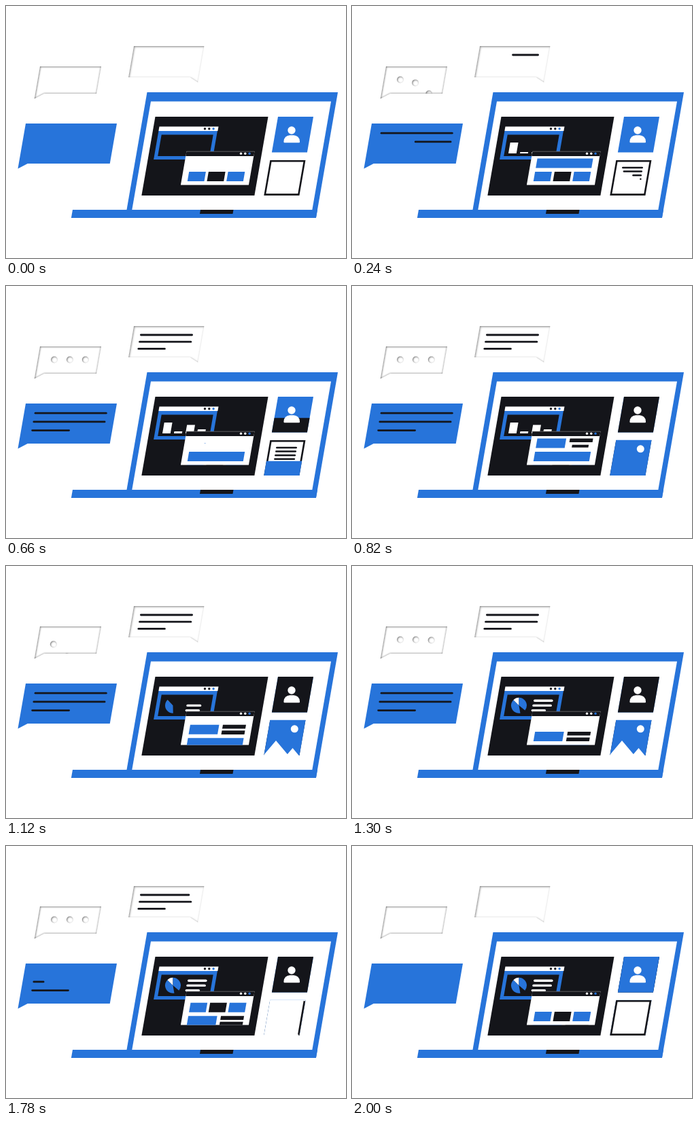
These frames come from a looping animation (500 px wide and 371 px high, 2.02 s). An HTML page with a canvas:

```html
<!DOCTYPE html>
<html>
<head>
<meta charset="utf-8">
<style>
html, body { margin: 0; width: 100%; height: 100%; overflow: hidden; background: #fff; }
canvas { display: block; }
</style>
</head>
<body>
<canvas id="stage" width="500" height="371"></canvas>
<script>
const ctx = document.getElementById('stage').getContext('2d');
const BLUE = '#2774da', DARK = '#14151a', WHITE = '#fff';
const SLANT = 0.1735, LOOP = 2020;
let t = 0;

const linear = (start, span) => Math.min(1, Math.max(0, (t - start) / span));

// Eased progress of a move
function ease(start, span) {
  const p = linear(start, span);
  return p < 0.5 ? 2 * p * p : 1 - 2 * (1 - p) ** 2;
}

function repeat(count, draw) {
  for (let i = 0; i < count; i++) draw(i);
}

function polygon(...points) {
  const path = new Path2D();
  points.forEach(([x, y]) => path.lineTo(x, y));
  path.closePath();
  return path;
}

// Every panel leans by the same angle; x is its top left corner
function slanted(x, y, w, h) {
  const foot = x - SLANT * h;
  return polygon([x, y], [x + w, y], [foot + w, y + h], [foot, y + h]);
}

function fill(path, color) {
  ctx.fillStyle = color;
  ctx.fill(path);
}

function panel(x, y, w, h, color) {
  if (w > 0 && h > 0) fill(slanted(x, y, w, h), color);
}

// Panel filled from its bottom edge upwards
function wipe([x, y, w, h], color, p) {
  const top = h * (1 - p);
  panel(x - SLANT * top, y + top, w, h - top, color);
}

function disc(x, y, r) {
  const path = new Path2D();
  path.arc(x, y, r, 0, 2 * Math.PI);
  return path;
}

function clipped(path, draw) {
  ctx.save();
  ctx.clip(path);
  draw();
  ctx.restore();
}

function innerShadow(path, offset, blur, alpha) {
  clipped(path, () => {
    const ring = new Path2D();
    ring.rect(-50, -50, 600, 471);
    ring.addPath(path);
    ctx.shadowColor = `rgba(0,0,0,${alpha})`;
    ctx.shadowOffsetX = ctx.shadowOffsetY = offset;
    ctx.shadowBlur = blur;
    ctx.fillStyle = WHITE;
    ctx.fill(ring, 'evenodd');
  });
}

function line(x0, x1, y, width, color) {
  if (x1 - x0 < 0.3) return;
  const r = Math.min(width / 2, (x1 - x0) / 2);
  ctx.strokeStyle = color;
  ctx.lineWidth = width;
  ctx.lineCap = 'round';
  ctx.beginPath();
  ctx.moveTo(x0 + r, y);
  ctx.lineTo(x1 - r, y);
  ctx.stroke();
}

// Lines along the slant, the last one short; both moves run leftwards
function textBlock({ x, y, w, gap, count, size, enter, leave = () => 0 }) {
  repeat(count, i => {
    const len = i === count - 1 ? w * 0.53 : w;
    const end = x - SLANT * gap * i + len;
    line(end - len * enter(i), end - len * leave(i), y + gap * i, size, DARK);
  });
}

function bubble(x, y, w, h, tailRight) {
  const foot = x - SLANT * h, bottom = y + h, drop = 7.5;
  const corner = tailRight ? foot + w : foot;
  const tip = [corner - SLANT * drop, bottom + drop];
  const notch = [corner + (tailRight ? -13 : 13), bottom];
  const base = tailRight
    ? [tip, notch, [foot, bottom]]
    : [[foot + w, bottom], notch, tip];
  return polygon([x, y], [x + w, y], ...base);
}

const typingBubble = bubble(50, 89, 90, 40);
const noteBubble = bubble(188, 59, 103.5, 46, true);
const mainBubble = bubble(29, 173, 134, 59);

function bubbles() {
  innerShadow(typingBubble, 0.3, 3, 0.75);
  innerShadow(noteBubble, 0.9, 3, 0.5);
  fill(mainBubble, BLUE);
  textBlock({
    x: 197, y: 72, w: 78, gap: 10.2, count: 3, size: 2.8,
    enter: i => ease(150 + i * 90, 180), leave: i => ease(1762 + i * 55, 110)
  });
  textBlock({
    x: 41.7, y: 187.2, w: 107, gap: 12.7, count: 3, size: 2.8,
    enter: i => ease(60 + i * 90, 180), leave: i => ease(1634 + i * 68, 110)
  });
  clipped(typingBubble, () => repeat(3, typingDot));
}

// Rises into place, later hops and falls out; twice per loop
function typingDot(i) {
  const again = t > 1000;
  const rise = again ? ease(1010 + i * 70, 170) : ease(60 + i * 60, 170);
  const p = again ? linear(1790 + i * 15, 160) : linear(840 + i * 25, 110);
  const drop = 28 * (1 - rise + p * p * (4.5 * p - 3.5));
  if (drop < 27.5) innerShadow(disc(71 + 22.9 * i - drop * SLANT, 108.5 + drop, 5), 0.8, 2.5, 0.6);
}

function laptop() {
  panel(207.5, 127, 280.5, 185, BLUE);
  panel(98, 300, 360, 12, BLUE);
  panel(213, 140.5, 265, 159.5, WHITE);
  panel(286, 300, 48.5, 6, DARK);
  panel(219.5, 163, 166, 116, DARK);
}

function titleBar(x, y, w, h, color, dotColor) {
  panel(x, y, w, h, color);
  repeat(3, i => fill(disc(x + w - 20 + i * 6.3, y + 3.3, 1.7), i < 2 ? dotColor : BLUE));
}

function slice(from, to, color) {
  if (from === to) return;
  const x = 245.5, y = 205.3, turn = Math.PI / 180;
  const path = new Path2D();
  path.moveTo(x, y);
  path.arc(x, y, 11.5, from * turn, to * turn);
  path.closePath();
  fill(path, color);
}

function chartWindow() {
  titleBar(225.5, 177.5, 87, 6.5, WHITE, DARK);
  panel(224.4, 184, 86.5, 42, BLUE);
  panel(228.7, 189.5, 76, 31.5, DARK);

  [16, 3, 12.5, 6].forEach((full, i) => {
    const h = full * (ease(80 + i * 60, 170) - ease(880 + i * 25, 110));
    panel(230 + i * 17 + SLANT * h, 217 - h, 11.8, h, WHITE);
  });

  slice(225 - 145 * ease(1030, 110), 225, BLUE);
  slice(225, 225 + 45 * ease(1110, 120), WHITE);
  slice(270, 270 + 130 * ease(1170, 140), BLUE);

  repeat(3, i => {
    const x = 267 - 1.7 * i, len = i < 2 ? 28.6 : 21.5;
    line(x, x + len * ease(1120 - i * 65, 100), 198.2 + 7.2 * i, 3.4, WHITE);
  });
}

// Block on the scrolling page, scaled about its centre
function block(x, y, w, h, color, scale) {
  const mid = y + h / 2, sh = h * scale;
  const cx = 268 + x + w / 2 - SLANT * (mid - 251);
  panel(cx - w * scale / 2 + SLANT * sh / 2, mid - sh / 2, w * scale, sh, color);
}

function pageWindow() {
  panel(265.5, 214, 100, 49.5, WHITE);
  titleBar(265.5, 214, 100, 7, DARK, WHITE);
  panel(265.5, 213.8, 100, 0.6, '#777');

  const step = 19.5;
  const scroll = ease(280, 360) + ease(950, 350) + ease(1640, 350);
  const row = n => 244 + step * (scroll - n);
  const tiles = (n, scale) => repeat(3, i =>
    block(28.7 * i, row(n), 24.7, 14, i === 1 ? DARK : BLUE, scale(i)));

  clipped(slanted(264.3, 221, 100, 42.5), () => {
    tiles(0, () => 1);
    block(0, row(1), 82, 14, BLUE, ease(60, 180));
    block(0, row(2), 42.5, 14, BLUE, ease(640, 140));
    repeat(2, i => block(48, row(2) + 8.5 * i, 34, 5.6, DARK, ease(690 + i * 50, 130)));
    tiles(3, i => ease(1330 + i * 50, 130));
  });
}

function avatarTile() {
  const tile = [400, 163, 52, 52.5];
  panel(...tile, BLUE);
  wipe(tile, DARK, ease(580, 180));
  wipe(tile, BLUE, ease(1800, 160));
  fill(disc(420, 183, 5.7), WHITE);
  const body = new Path2D();
  body.roundRect(408.5, 190.2, 23.5, 11, [9, 9, 1, 1]);
  fill(body, WHITE);
}

// Frame drawn clockwise from its top right corner
function outline(p) {
  if (!p) return;
  const w = 49.5, h = 49.4;
  const around = 2 * (w + h * Math.hypot(1, SLANT));
  ctx.save();
  ctx.strokeStyle = DARK;
  ctx.lineWidth = 2.6;
  ctx.lineCap = 'butt';
  if (p < 1) ctx.setLineDash([around * p, around]);
  ctx.lineDashOffset = -w;
  ctx.stroke(slanted(389.4, 228.2, w, h));
  ctx.restore();
}

function peak(x, y, h) {
  fill(polygon([x, y], [x + 0.84 * h, y + h], [x - 0.84 * h, y + h]), WHITE);
}

function pictureTile() {
  const tile = [388.3, 226.8, 52.3, 52.2];
  outline(1);
  textBlock({
    x: 397, y: 238, w: 31, gap: 5.6, count: 6, size: 2.5,
    enter: i => ease(40 + i * 58, 180)
  });
  wipe(tile, BLUE, ease(580, 180));
  fill(disc(424.3, 239.8, 5.5 * ease(700, 110)), WHITE);

  const sink = 24 * (1 - ease(850, 255));
  clipped(slanted(388.3, 226, 54, 54), () => {
    ctx.translate(-sink * SLANT, sink);
    peak(397, 257, 24);
    peak(421.5, 268, 13);
  });
  wipe(tile, WHITE, ease(1640, 90));
  outline(ease(1710, 200));
}

function frame(now) {
  t = now % LOOP;
  ctx.fillStyle = WHITE;
  ctx.fillRect(0, 0, 500, 371);
  bubbles();
  laptop();
  chartWindow();
  pageWindow();
  avatarTile();
  pictureTile();
}

const begin = performance.now();
function tick() {
  frame(performance.now() - begin);
  requestAnimationFrame(tick);
}
tick();
</script>
</body>
</html>
```
